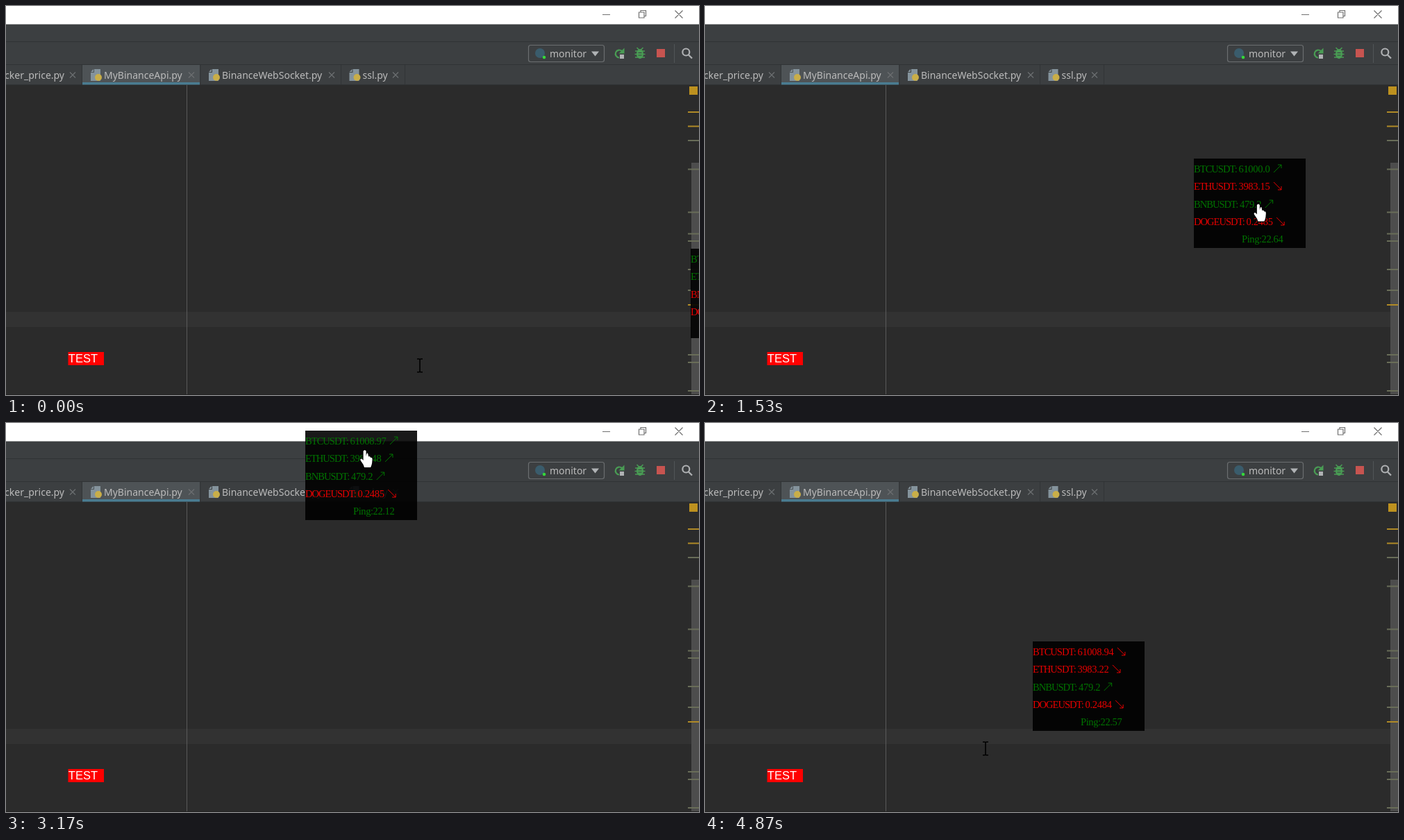
An HTML page with a canvas that plays this animation: 998x561 px, repeating every 4.91 s.

```html
<!DOCTYPE html>
<html lang="en">
<head>
<meta charset="utf-8">
<title>Price monitor</title>
<style>
html, body { margin: 0; width: 100%; height: 100%; overflow: hidden; background: #2b2b2b; }
canvas { display: block; }
</style>
</head>
<body>
<canvas id="stage" width="998" height="561"></canvas>
<script>
const ctx = document.getElementById('stage').getContext('2d');
const LOOP = 4910;
const UI = '14px "Noto Sans", sans-serif';
const SERIF = '14.5px "Liberation Serif", serif';
const PANEL_W = 161, PANEL_H = 129, PEEK = 12;

const smooth = u => u * u * (3 - 2 * u);
const easeIn = u => u ** 3;
const easeOut = u => 1 - (1 - u) ** 3;
const ramp = (t, start, end) => Math.min(1, Math.max(0, (t - start) / (end - start)));

// Pointer moves: start, end, target x, target y, easing
const home = [596, 518];
const moves = [
  [200, 670, 984, 505],
  [770, 1190, 942, 427],
  [1330, 1830, 533, 28],
  [1870, 2370, 314, 365],
  [2400, 2660, 517, 44],
  [2690, 2890, 513, 26],
  [2930, 3430, 545, 142, easeIn],
  [3430, 3770, 557, 340, easeOut],
  [4000, 4330, 290, 537],
  [4740, 4865, 404, 469]
];

// Prices at each tick; a row's direction follows its last change
const ticks = [0, 930, 2060, 3000, 4490];
const rows = [
  { name: 'BTCUSDT: ', rising: true, prices: ['60999.9', '61000.0', '61005.02', '61008.97', '61008.94'] },
  { name: 'ETHUSDT: ', rising: true, prices: ['3983.16', '3983.15', '3983.15', '3983.48', '3983.22'] },
  { name: 'BNBUSDT: ', rising: false, prices: ['479.1', '479.2', '479.2', '479.2', '479.2'] },
  { name: 'DOGEUSDT: ', rising: false, prices: ['0.2486', '0.2485', '0.2485', '0.2485', '0.2484'] }
];
const pings = ['22.64', '22.64', '22.12', '22.12', '22.57'];

const handShape = new Path2D('M-2 1.5Q0-1.5 2 1.5V9Q4-.5 5.5 9.5Q7.5 8 8.5 11Q11 10 11 13.5L10.5 19Q10 22 8.5 25H-.5Q-1.5 21-4 18Q-8 13-5 12.5Q-3.5 12.5-2 15Z');
const arrowShape = new Path2D('M0 0V18L4 14.2L7 21.5L10 20.2L7 13.2H12.5Z');

function pointerAt(t) {
  let [x, y] = home;
  for (const [start, end, toX, toY, ease = smooth] of moves) {
    const k = ease(ramp(t, start, end));
    x += (toX - x) * k;
    y += (toY - y) * k;
  }
  return { x, y };
}

function panelAt(t) {
  const grab = pointerAt(t - 10); // a dragged panel lags slightly
  let x = 998 - PEEK - (PANEL_W - PEEK) * ramp(t, 880, 1030), y = 350, h = PANEL_H;
  if (t > 1330) {
    x = Math.max(428, grab.x - 105);
    y = Math.max(0, grab.y - 77);
  }
  if (t > 1830) {
    x = 428;
    y = 0;
    h -= (PANEL_H - PEEK + 0.5) * (ramp(t, 2070, 2200) - ramp(t, 2770, 2890));
  }
  if (t > 2930) {
    const held = pointerAt(Math.min(t - 10, 3870));
    x = held.x - 85;
    y = held.y - 26 + ramp(t, 3780, 3870);
  }
  return { x: Math.round(x), y: Math.round(y), h };
}

function box(color, x, y, w, h) {
  ctx.fillStyle = color;
  ctx.fillRect(x, y, w, h);
}
function ellipse(color, x, y, rx, ry = rx) {
  ctx.fillStyle = color;
  ctx.beginPath();
  ctx.ellipse(x, y, rx, ry, 0, 0, 7);
  ctx.fill();
}
function line(color, width, d) {
  ctx.strokeStyle = color;
  ctx.lineWidth = width;
  ctx.stroke(new Path2D(d));
}
function fill(color, d) {
  ctx.fillStyle = color;
  ctx.fill(new Path2D(d));
}
function text(str, x, y, font, color, spacing = 0) {
  ctx.font = font;
  ctx.letterSpacing = spacing + 'px';
  ctx.fillStyle = color;
  ctx.fillText(str, x, y);
  return x + ctx.measureText(str).width;
}

function drawClose(x) {
  line('#6c6f71', 1.3, `M${x - 4} 95.5l8 8m0-8l-8 8`);
}
function drawTab(name, x, closeX) {
  fill('#84939c', `M${x} 96h5v-5h9v17h-14zM${x} 95l4-4v4z`);
  ellipse('#c9ae48', x + 11, 103, 5);
  text(name, x + 19, 105, UI, '#bbbbbb');
  drawClose(closeX);
}

function drawToolbar() {
  ctx.strokeStyle = '#6b6e70';
  ctx.lineWidth = 1.2;
  ctx.beginPath();
  ctx.roundRect(752.5, 56.5, 109, 24, 3);
  ctx.stroke();
  ellipse('#3a5c6c', 769, 68, 7);
  ellipse('#35d83a', 775, 74, 2.3);
  text('monitor', 783, 74, UI, '#bbbbbb');
  fill('#b0b3b5', 'M843 65.5h11l-5.5 7z');

  line('#499c54', 2.2, 'M883 74.5a5.5 5.5 0 1 1 4-9.5');
  fill('#499c54', 'M890.5 60.5v8h-8z');
  box('#afb1b3', 884, 70, 6, 6);

  line('#499c54', 1.6, 'M906 65h14M905.5 69.5h15M906 74h14M908.5 60l3 3M917.5 60l-3 3');
  ellipse('#499c54', 913, 69, 5, 7);
  line('#3c3f41', 1.2, 'M910.5 67.5h5M910.5 71h5');

  box('#c75450', 937, 62, 12, 12);
  box('#515557', 962, 55, 1, 27);
  line('#afb1b3', 2.2, 'M984.3 66.5a5 5 0 1 1-10 0a5 5 0 1 1 10 0M983 70.5l5 5');
}

function drawEditor() {
  box('#2b2b2b', 0, 114, 998, 447);
  box('#323232', 0, 441, 987, 22);
  box('#5a5a5a', 260, 114, 1, 447);
  box('#4d4d4d', 987, 226, 11, 335);
  box('#bd911f', 984, 116, 12, 12);
  for (const y of [153, 173.5, 431]) box('#b08a26', 982, y - 1, 16, 2);
  for (const y of [194, 235.5, 297.5, 328.5, 339, 380, 410, 503, 514, 555]) box('#696d58', 982, y - 1, 16, 2);
  box('#222222', 0, 560, 998, 1);
  box('#ff0000', 89.5, 499, 51.5, 19);
  text('TEST', 89.8, 514, '16.5px "Liberation Sans", sans-serif', '#fff');
}

function drawIde() {
  box('#3c3f41', 0, 26, 998, 88);
  box('#fff', 0, 0, 998, 26.4);
  line('#707070', 1.2, 'M859 12.5h11M911.5 9h7.5v8h-7.5zM914 9v-2.5h7.5v8h-2.5M963.5 6.5l11 11m0-11l-11 11');
  for (const y of [51, 84, 113]) box('#303335', 0, y, 998, 1);
  box('#4e5356', 110, 85, 169, 26);
  box('#4a7c91', 110, 110, 169, 3.5);
  for (const x of [109, 279.5, 482, 574]) box('#313436', x, 85, 1, 28);
  ctx.textAlign = 'right';
  text('cker_price.py', 84, 105, UI, '#bbbbbb');
  ctx.textAlign = 'left';
  drawClose(96);
  drawTab('MyBinanceApi.py', 122, 267);
  drawTab('BinanceWebSocket.py', 292, 469);
  drawTab('ssl.py', 494.5, 561);
  drawToolbar();
  drawEditor();
}

function drawPanel(t, { x, y, h }) {
  const tick = ticks.findLastIndex(start => start <= t);
  ctx.save();
  ctx.globalAlpha = 0.9;
  ctx.translate(x, y);
  ctx.beginPath();
  ctx.rect(0, 0, PANEL_W, h);
  ctx.clip();
  box('#000', 0, 0, PANEL_W, h);
  rows.forEach(({ name, rising, prices }, i) => {
    const price = prices[tick];
    const before = prices.slice(0, tick).findLast(p => p !== price);
    const up = before ? +price > +before : rising;
    const color = up ? '#008000' : '#ff0000';
    const base = Math.round(20 + i * 25.3);
    const end = text(price, text(name, 0, base, SERIF, color, -0.95), base, SERIF, color, -0.3) + 5.5;
    line(color, 1, up ? `M${end} ${base}l11-11m-5 0h5v5` : `M${end} ${base - 11}l11 11m-5 0h5v-5`);
  });
  text('Ping:' + pings[tick], 69, 121, SERIF, '#008000', -0.4);
  ctx.restore();
}

function drawPointer({ x, y }, panel) {
  ctx.save();
  ctx.translate(x, y);
  const overPanel = x >= panel.x && x < panel.x + PANEL_W && y >= panel.y && y < panel.y + panel.h;
  if (!overPanel && y > 114 && x < 982) {
    line('#000', 1.6, 'M-4-9h3l1 1l1-1h3M0-8v17M-4 10h3l1-1l1 1h3');
  } else {
    const shape = overPanel ? handShape : arrowShape;
    ctx.strokeStyle = '#000';
    ctx.lineWidth = 2;
    ctx.stroke(shape);
    ctx.fillStyle = '#fff';
    ctx.fill(shape);
  }
  ctx.restore();
}

function frame() {
  const t = performance.now() % LOOP;
  const panel = panelAt(t);
  drawIde();
  drawPanel(t, panel);
  drawPointer(pointerAt(t), panel);
  requestAnimationFrame(frame);
}
frame();
</script>
</body>
</html>
```
